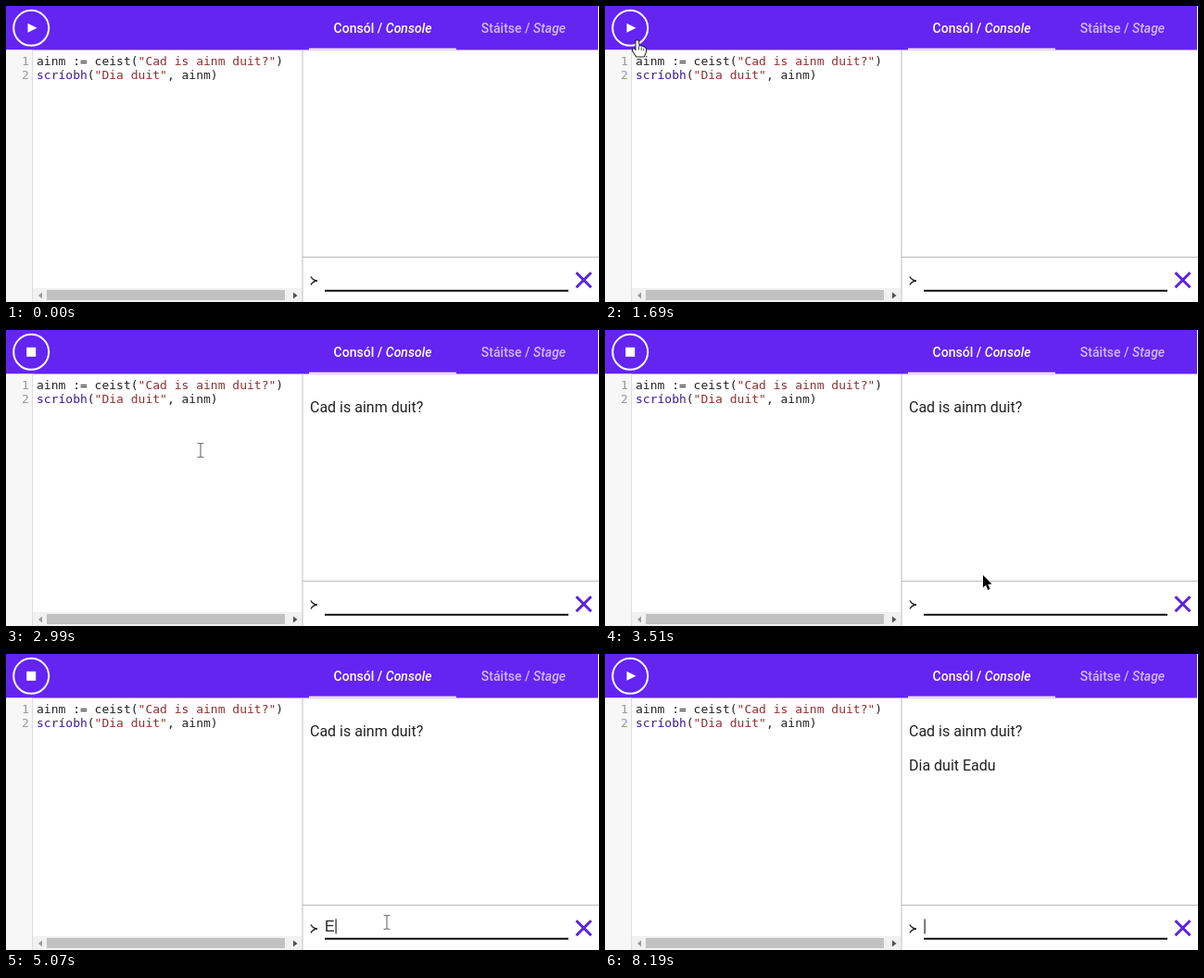
Recreate the animation shown at these times as an HTML page with a canvas. Size 640x320 px, loop 8.45 s.

```html
<!DOCTYPE html>
<html lang="ga">
<head>
<meta charset="utf-8">
<title>Consól</title>
<style>
html, body { margin: 0; width: 100%; height: 100%; overflow: hidden; background: #fff; }
canvas { display: block; }
</style>
</head>
<body>
<canvas id="stage" width="640" height="320"></canvas>
<script>
const ctx = document.getElementById('stage').getContext('2d');
const LOOP = 8450, TICK = 130, BLINK = 650;
const RUN = 2340, FOCUS = 3900, ENTER = 6500;
const KEYS = [5070, 5590, 5850, 6110];
const NAME = 'Eadu';
const PURPLE = '#6424f2', STRING = '#8f3030', BUILTIN = '#3a1a9c', INK = '#222';
const MONO = '13px "DejaVu Sans Mono", monospace';
const BODY = '16px Roboto, sans-serif';
const TAB = '500 14px Roboto, sans-serif';
const INPUT = '16px "Liberation Sans", Arial, sans-serif';
const BUTTON = { x: 27.2, y: 23.8 };

// Pointer positions: [ms, x, y]
const IN = [[1170, 150, 165], [1690, 35, 37.5], [1950, 31, 30]];
const OUT = [[2470, 31, 30], [2990, 210, 130], [3380, 388, 246], [3510, 408, 265], [3770, 411, 290]];

function rect(x, y, w, h, color) {
  ctx.fillStyle = color;
  ctx.fillRect(x, y, w, h);
}

// Draws text and returns the x where it ends.
function text(str, x, y, font, color) {
  ctx.font = font;
  ctx.fillStyle = color;
  ctx.fillText(str, x, y);
  return x + ctx.measureText(str).width;
}

function runs(x, y, font, parts) {
  for (const [str, color] of parts) x = text(str, x, y, font, color);
}

function shape(points, fill, stroke, width = 1) {
  ctx.beginPath();
  points.forEach(([x, y]) => ctx.lineTo(x, y));
  ctx.closePath();
  if (stroke) {
    ctx.strokeStyle = stroke;
    ctx.lineWidth = width;
    ctx.stroke();
  }
  ctx.fillStyle = fill;
  ctx.fill();
}

function line(path, color, width) {
  ctx.strokeStyle = color;
  ctx.lineWidth = width;
  ctx.stroke(new Path2D(path));
}

function tab(first, second, center, color) {
  const italic = 'italic ' + TAB;
  ctx.font = TAB;
  const firstWidth = ctx.measureText(first).width;
  ctx.font = italic;
  const x = center - (firstWidth + ctx.measureText(second).width) / 2;
  text(second, text(first, x, 28.5, TAB, color), 28.5, italic, color);
}

function header(running, hover) {
  const { x, y } = BUTTON;
  rect(0, 0, 639, 47.5, PURPLE);
  ctx.beginPath();
  ctx.arc(x, y, 19, 0, Math.PI * 2);
  ctx.strokeStyle = '#fff';
  ctx.lineWidth = 2;
  ctx.stroke();
  if (running) rect(x - 5, y - 5, 10, 10, hover ? '#ddd8e8' : '#fff');
  else shape([[x - 3.7, y - 5], [x + 6.3, y], [x - 3.7, y + 5]], '#fff');
  tab('Consól / ', 'Console', 406.5, '#fff');
  tab('Stáitse / ', 'Stage', 558.5, '#cfbbff');
  rect(327, 45.7, 159, 1.8, '#fff3e0');
}

function editor() {
  rect(0, 47.5, 28, 272.5, '#f7f7f7');
  rect(28, 47.5, 1, 272.5, '#ddd');
  text('1', 17, 64, MONO, '#999');
  text('2', 17, 79, MONO, '#999');
  runs(33, 64, MONO, [['ainm := ceist(', INK], ['"Cad is ainm duit?"', STRING], [')', INK]]);
  runs(33, 79, MONO, [['scríobh', BUILTIN], ['(', INK], ['"Dia duit"', STRING], [', ainm)', INK]]);
  rect(29, 305, 290, 15, '#f1f1f1');
  rect(44, 307, 257, 11, '#c1c1c1');
  shape([[39, 309.5], [39, 316.5], [35, 313]], '#999');
  shape([[310, 309.5], [310, 316.5], [314.5, 313]], '#505050');
}

function consolePane(t) {
  rect(319.5, 47.5, 1, 272.5, '#bbb');
  rect(320, 271, 320, 1, '#bbb');
  if (t >= RUN) text('Cad is ainm duit?', 328, 89, BODY, INK);
  if (t >= ENTER) text('Dia duit ' + NAME, 328, 126, BODY, INK);
  line('M329 292.5Q331 296.5 336 297Q331 297.5 329 301.5', INK, 1.4);
  rect(344, 306.8, 263, 2, '#111');
  line('M615.5 288.2L631.5 304.2M631.5 288.2L615.5 304.2', '#5b22df', 3);

  const typed = t < ENTER ? NAME.slice(0, KEYS.filter(k => t >= k).length) : '';
  const end = text(typed, 344, 300, INPUT, INK);
  if (t < FOCUS) return;
  const lastReset = [FOCUS, ...KEYS, ENTER].filter(k => t >= k).pop();
  if (Math.floor((t - lastReset) / BLINK) % 2 === 0) {
    rect(Math.round(end) + 0.5, 286.5, 1.2, 16, INK);
  }
}

function pointAt(path, t) {
  let i = 1;
  while (i < path.length - 1 && t > path[i][0]) i++;
  const [t0, x0, y0] = path[i - 1], [t1, x1, y1] = path[i];
  const k = Math.min(1, Math.max(0, (t - t0) / (t1 - t0)));
  return [x0 + (x1 - x0) * k, y0 + (y1 - y0) * k];
}

function hand() {
  shape([[-1.5, 0], [1, 0], [1.5, 6], [4, 6], [7, 7], [9, 8.5], [9, 12], [7, 17],
    [-1, 17], [-5, 11], [-5, 9], [-3.5, 9], [-1.5, 11]], '#fff', INK, 2);
  line('M1.5 6V10M4.2 7V10.5M6.8 8V11', INK, 0.8);
}

function arrow() {
  shape([[0, 0], [0, 13.5], [3, 10.8], [5.2, 16], [7.5, 15], [5.3, 10], [9.5, 9.6]], '#000', '#fff', 1.6);
}

function beam() {
  line('M-3.5 -7.5H-1L0 -6.5L1 -7.5H3.5M0 -6.5V6.5M-3.5 7.5H-1L0 6.5L1 7.5H3.5', '#777', 1.2);
}

function pointer(t) {
  if (t < IN[0][0] || t >= KEYS[1]) return;
  const [x, y] = pointAt(t < OUT[0][0] ? IN : OUT, t);
  const overButton = Math.hypot(x - BUTTON.x, y - BUTTON.y) < 21;
  const overText = (x > 29 && x < 318 && y > 48) || (x > 344 && y > 280);
  ctx.save();
  ctx.translate(x, y);
  if (overButton) hand();
  else if (overText) beam();
  else arrow();
  ctx.restore();
}

function draw(t) {
  rect(0, 0, 640, 320, '#fff');
  header(t >= RUN && t < ENTER, t < 2600);
  editor();
  consolePane(t);
  pointer(t);
}

const start = performance.now();

function tick(now) {
  const elapsed = Math.max(0, now - start) % LOOP;
  draw(Math.floor(elapsed / TICK) * TICK);
  requestAnimationFrame(tick);
}

draw(0);
requestAnimationFrame(tick);
</script>
</body>
</html>
```
